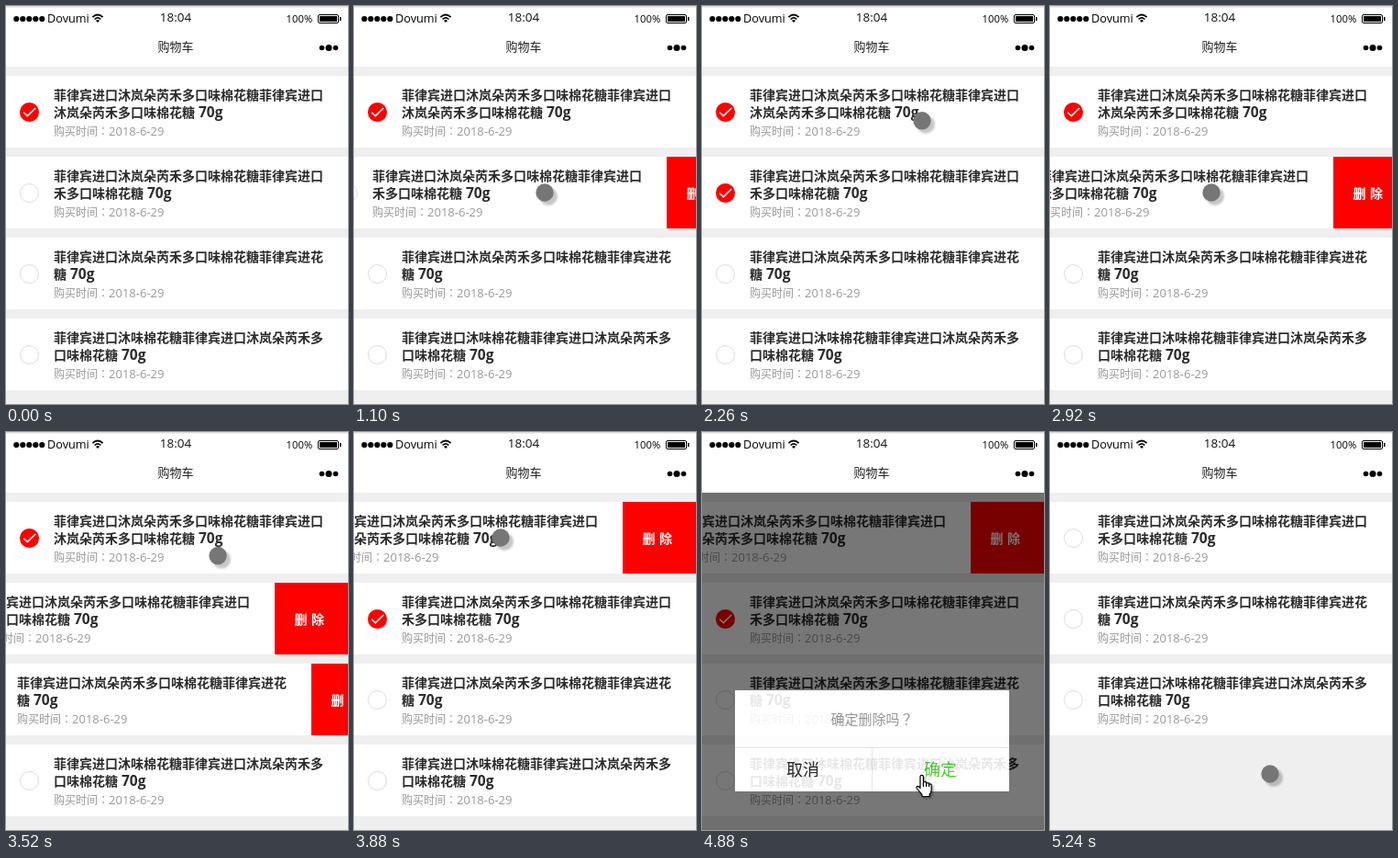
Animation, 373 px wide and 433 px high, one loop 5370 ms. Source, as an HTML page:

```html
<!DOCTYPE html>
<html lang="zh-CN">
<head>
<meta charset="utf-8">
<title>购物车</title>
<style>
  html, body { margin: 0; width: 100%; height: 100%; overflow: hidden; background: #efefef; }
  svg { display: block; width: 373px; height: 433px; }
  text { font-family: "Noto Sans CJK SC", "Noto Sans CJK", "Noto Sans CJK JP", sans-serif; white-space: pre; }
  .lat { font-family: "Open Sans", "Noto Sans", sans-serif; }
  .mark { font-family: "Noto Sans CJK TC", "Noto Sans CJK JP", sans-serif; }
  .name { font-size: 14px; font-weight: 700; fill: #2b2b2b; }
  .name .lat { font-size: 15.5px; }
  .date { font-size: 12px; fill: #999; }
  .date .lat { font-size: 13px; }
  .del { font-size: 14px; font-weight: 700; fill: #fff; }
  .mid { text-anchor: middle; }
</style>
</head>
<body>
<svg viewBox="0 0 373 433" xmlns="http://www.w3.org/2000/svg">
  <defs>
    <filter id="soft" x="-50%" y="-50%" width="200%" height="200%"><feGaussianBlur stdDeviation="1.3"/></filter>
    <filter id="drop" x="-50%" y="-50%" width="200%" height="200%"><feDropShadow dx="1.5" dy="1.5" stdDeviation="1" flood-opacity=".4"/></filter>
  </defs>
  <rect width="373" height="433" fill="#efefef"/>
  <g id="list"></g>
  <!-- the shade leaves the dialog area open -->
  <path id="shade" d="M0 66H373V433H0ZM36 281H335V391H36Z" fill-rule="evenodd"/>
  <g id="modal">
    <rect x="36" y="281" width="299" height="110" fill="#fff"/>
    <path d="M36 343.5H335M185.5 344V391" stroke="#e2e2e2" fill="none"/>
    <text class="mid" x="185.5" y="318" font-size="15" fill="#888">确定删除吗<tspan class="mark" lang="zh-TW">？</tspan></text>
    <text class="mid" x="110" y="374" font-size="18" fill="#111">取消</text>
    <text class="mid" x="260" y="374" font-size="18" fill="#3cc51f">确定</text>
  </g>
  <g id="head">
    <rect width="373" height="66" fill="#fff"/>
    <rect width="373" height="1.5" fill="#dedbd6"/>
    <g id="signal"></g>
    <text class="lat" x="45" y="17.5" font-size="12.7">Dovumi</text>
    <g fill="none" stroke="#000" stroke-width="1.7">
      <path d="M94.4 12.2Q100 6.8 105.6 12.2M96.6 14.5Q100 11.2 103.4 14.5"/>
      <path d="M98 15.9Q100 14 102 15.9L100 18Z" fill="#000" stroke="none"/>
    </g>
    <text class="lat mid" x="185" y="17" font-size="13.5" fill="#111">18:04</text>
    <text class="lat" x="305.5" y="18" font-size="11.3">100%</text>
    <rect x="340.5" y="9.5" width="22" height="9" rx="1.5" fill="#fff" stroke="#000"/>
    <rect x="342" y="11" width="19" height="6"/>
    <path d="M364 12h1.5v4h-1.5z"/>
    <text class="mid" x="185" y="48.7" font-size="13" fill="#222">购物车</text>
    <circle cx="344.5" cy="45.5" r="2.8"/><circle cx="352" cy="45.5" r="3.5"/><circle cx="359.5" cy="45.5" r="2.8"/>
  </g>
  <g id="cursor">
    <g id="dot">
      <circle cx="4" cy="4" r="10" opacity=".22" filter="url(#soft)"/>
      <circle r="9.7" fill="#767676"/>
    </g>
    <g id="arrow" fill="#fff" stroke="#000" stroke-linejoin="round" filter="url(#drop)">
      <path d="M0 0V16.5L3.8 13L6.3 18.8L8.8 17.7L6.3 12.2H11.7Z"/>
    </g>
    <g id="hand" fill="#fff" stroke="#000" stroke-width="1.2" stroke-linejoin="round" transform="translate(-7 1)" filter="url(#drop)">
      <path d="M5 2a1.7 1.7 0 0 1 3.4 0V9q0-1.6 1.6-1.6T11.6 9v1q0-1.4 1.5-1.4T14.6 10v1q0-1.2 1.3-1.2T17.2 11v5q0 3-2 5v2.5H7v-2Q4 18 1.2 14.5Q.4 12.5 2.2 12.3Q3.6 12.3 5 14.5Z"/>
      <path d="M8.4 9v4M11.6 10v3M14.6 11v2" fill="none"/>
    </g>
  </g>
</svg>
<script>
const LOOP = 5370, STEP = 60, DRAG = 5, SETTLE = 4;
const PITCH = 88, OPEN = 80, GRIP = 240;

const $ = id => document.getElementById(id);
const show = (el, on) => el.setAttribute('display', on ? 'inline' : 'none');
const move = (el, x, y) => el.setAttribute('transform', `translate(${x} ${y})`);
const rowMid = i => 115 + i * PITCH;

// Progress 0..1 in equal steps; the first step shows at once.
const ramp = (t, start, steps) =>
  Math.min(1, Math.max(0, Math.floor((t - start) / STEP) + 1) / steps);
const linear = k => k;
const easeOut = k => k * (2 - k);

const swipes = [
  { row: 1, open: 1040, close: 1400 },
  { row: 0, open: 2380, close: 2740 },
  { row: 1, open: 2740, close: 3700 },
  { row: 2, open: 3160, close: 3460 },
  { row: 0, open: 3640, close: LOOP }
];
const offset = (row, t) => swipes
  .filter(s => s.row === row)
  .reduce((x, s) => x + OPEN * (ramp(t, s.close, SETTLE) - ramp(t, s.open, DRAG)), 0);

// Pointer path: drags follow the rows, travel between them eases out.
const legs = [];
const go = (start, steps, x, y, ease = easeOut) => legs.push({ start, steps, x, y, ease });
const drag = s => go(s.open, DRAG, GRIP - OPEN, rowMid(s.row), linear);

go(660, 4, GRIP, 203);
drag(swipes[0]);
go(swipes[0].close, SETTLE, GRIP, 203, linear);
go(1640, 4, 26, 203);
go(1940, 4, GRIP, 203);
let free = 2200;
for (const s of swipes.slice(1)) {
  go(free, Math.max(1, (s.open - free) / STEP), GRIP, rowMid(s.row));
  drag(s);
  free = s.open + DRAG * STEP;
}
go(free, 2, 336, 113);
go(4320, 5, GRIP, 372);

function pointer(t) {
  return legs.reduce(([x, y], leg) => {
    const k = leg.ease(ramp(t, leg.start, leg.steps));
    return [x + (leg.x - x) * k, y + (leg.y - y) * k];
  }, [268, 246]);
}

const brand = '沐岚朵芮禾', from = '菲律宾进口', sweet = '多口味棉花糖';
const items = [
  [from + brand + sweet + from, brand + sweet],
  [from + brand + sweet + from, brand[4] + sweet],
  [from + brand + sweet + '菲律宾进花', '糖'],
  [from + brand[0] + '味棉花糖' + from + brand + '多', '口味棉花糖']
];

$('list').innerHTML = items.map(([a, b]) => `<g>
  <rect width="373" height="78" fill="#fff"/>
  <circle cx="25.5" cy="39.5" r="10" fill="#fff" stroke="#dcdcdc"/>
  <g><circle cx="25.5" cy="39.5" r="10.5" fill="#f00"/>
    <path d="M19.3 39.8L23.3 43.6L32.2 35" fill="none" stroke="#fff" stroke-width="1.5"/></g>
  <text class="name" x="52" y="25.5">${a}</text>
  <text class="name" x="52" y="44.5">${b}<tspan class="lat"> 70g</tspan></text>
  <text class="date" x="52" y="65">购买时间<tspan class="mark" lang="zh-TW">：</tspan><tspan class="lat">2018-6-29</tspan></text>
  <rect x="373" width="80" height="78" fill="#f00"/>
  <text class="del" y="45"><tspan x="394.5">删</tspan><tspan x="413">除</tspan></text>
</g>`).join('');
$('signal').innerHTML = [0, 1, 2, 3, 4].map(i => `<circle cx="${11.3 + i * 7}" cy="14" r="3.1"/>`).join('');

const rows = [...$('list').children];
const ticks = rows.map(r => r.querySelector('g'));

function draw(t) {
  const lift = PITCH * ramp(t, 5180, 2);
  rows.forEach((row, i) => move(row, offset(i, t), 76 + i * PITCH - (i ? lift : 0)));
  show(rows[0], t < 5120);
  ticks.forEach((tick, i) => show(tick, i === 0 || (i === 1 && t >= 1880 && t < 5180)));

  const alpha = ramp(t, 4320, 5) - ramp(t, 4820, 6) ** 2;
  $('shade').setAttribute('opacity', alpha * .6);
  $('modal').setAttribute('opacity', alpha);

  const hand = t >= 4560 && t < 5120;
  const arrow = t >= 4000 && t < 4560;
  move($('cursor'), ...pointer(t));
  show($('cursor'), t >= 660);
  show($('hand'), hand);
  show($('arrow'), arrow);
  show($('dot'), !hand && !arrow);
}

const origin = performance.now();
function tick() {
  draw((performance.now() - origin) % LOOP);
  requestAnimationFrame(tick);
}
tick();
</script>
</body>
</html>
```
